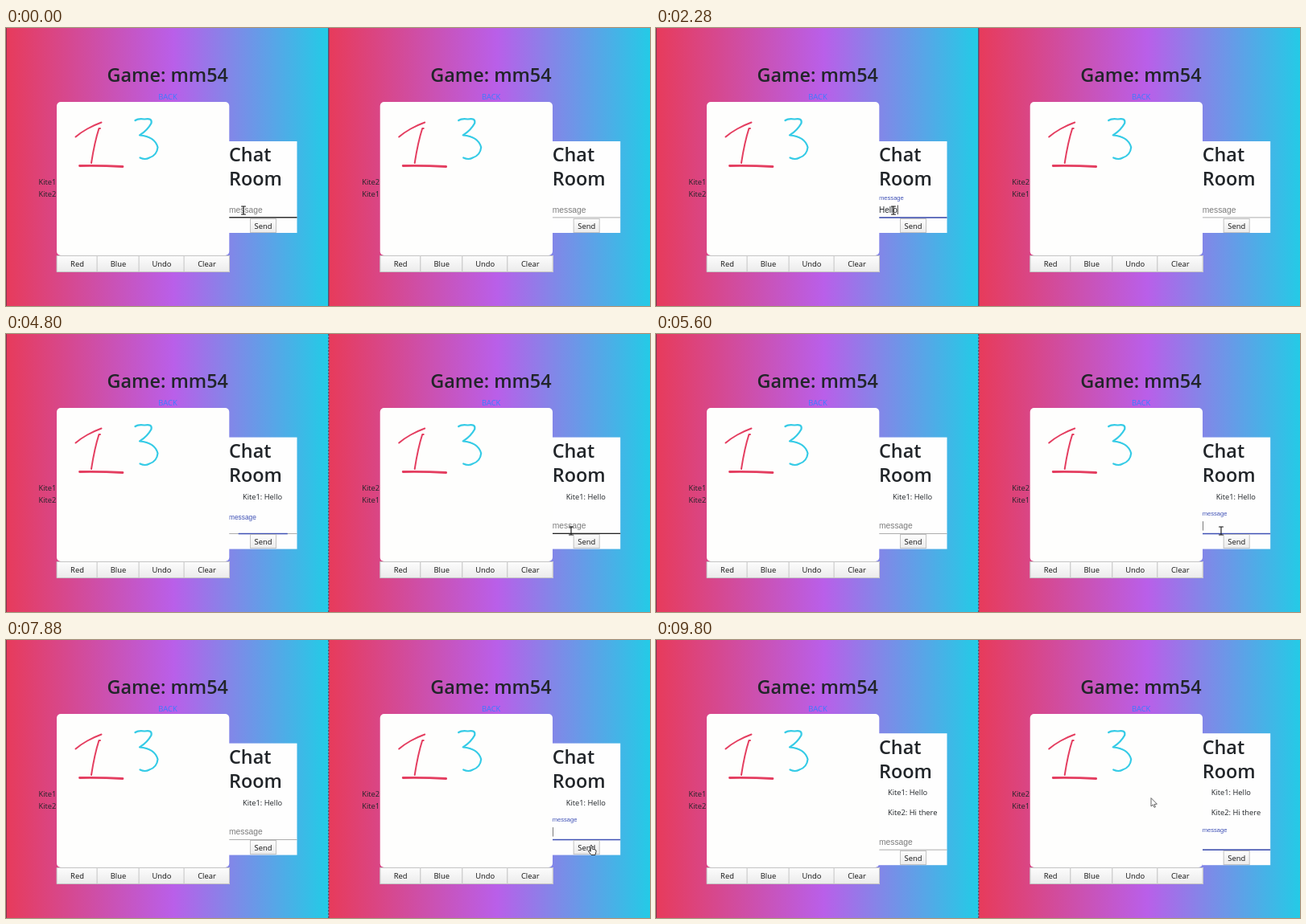
Animation of 800 by 346 pixels, one loop 9.88 s. Source, as an HTML page with a canvas:

```html
<!DOCTYPE html>
<html lang="en">
<head>
<meta charset="utf-8">
<title>Drawing game with chat</title>
<style>
html, body { margin: 0; width: 100%; height: 100%; overflow: hidden; }
canvas { display: block; }
</style>
</head>
<body>
<canvas id="stage" width="800" height="346"></canvas>
<script>
const ctx = document.getElementById('stage').getContext('2d');
const LOOP = 9880, BLINK = 530, SHIFT = 401.7;
const UI = '"Open Sans", "Noto Sans", sans-serif';
const FIELD = '"Liberation Sans", Arial, sans-serif';
const INK = '#212529', INDIGO = '#3f51b5', RED = '#e43e60', BLUE = '#35cbe6';
const TITLE = `600 23.4px ${UI}`;
const PLAYERS = ['Kite1', 'Kite2'];

const chats = [
  { focus: 480, blur: 4770, typeFrom: 1400, typeTo: 2300, sent: 3200, text: 'Hello' },
  { focus: 4900, blur: Infinity, typeFrom: 5500, typeTo: 6500, sent: 7700, text: 'Hi there' }
];
const arrivals = [3500, 8000];

// time, x, y
const mousePath = [
  [0, 295, 227], [2500, 295, 227], [3000, 313, 243], [3500, 313, 243],
  [4500, 702, 245], [6900, 702, 245], [7600, 727, 255], [8300, 727, 255],
  [9200, 615, 197], [LOOP, 615, 197]
];

const clamp = u => Math.max(0, Math.min(1, u));
const easeOut = u => 1 - (1 - clamp(u)) ** 2;
const smooth = u => u * u * (3 - 2 * u);
const mix = (a, b, u) => a + (b - a) * u;

function mouseAt(t) {
  const i = mousePath.findIndex(p => p[0] > t);
  const [t0, x0, y0] = mousePath[i - 1], [t1, x1, y1] = mousePath[i];
  const u = smooth((t - t0) / (t1 - t0));
  return { x: mix(x0, x1, u), y: mix(y0, y1, u) };
}

function label(text, x, y, font, color = INK, align = 'left') {
  ctx.font = font;
  ctx.fillStyle = color;
  ctx.textAlign = align;
  ctx.fillText(text, x, y);
}

function box(x, y, w, h, fill) {
  ctx.fillStyle = fill;
  ctx.fillRect(x, y, w, h);
}

function button(text, x, y, w, h, baseline) {
  const shade = ctx.createLinearGradient(0, y, 0, y + h);
  shade.addColorStop(0, '#fdfdfd');
  shade.addColorStop(1, '#ebebeb');
  box(x, y, w, h, shade);
  ctx.strokeStyle = '#c4c4c4';
  ctx.lineWidth = 1;
  ctx.strokeRect(x + .5, y + .5, w - 1, h - 1);
  label(text, x + w / 2, baseline, `9.4px ${UI}`, '#111', 'center');
}

function stroke(path, color, width) {
  ctx.strokeStyle = color;
  ctx.lineWidth = width;
  ctx.lineCap = ctx.lineJoin = 'round';
  ctx.stroke(new Path2D(path));
}

function background() {
  const g = ctx.createLinearGradient(0, 0, 401, 0);
  g.addColorStop(0, '#e73b5b');
  g.addColorStop(.52, '#b95fe9');
  g.addColorStop(1, '#22cce6');
  box(-1, 0, 403, 346, g);
}

function drawing() {
  ctx.fillStyle = '#fefefd';
  ctx.beginPath();
  ctx.roundRect(63, 92, 214.3, 191, 5);
  ctx.fill();
  stroke('M86.5 135.5 Q93 130 101 125.5 T118.5 117.5', RED, 2);
  stroke('M117 125 L115.5 125 Q110 142 106 168', RED, 2);
  stroke('M91.5 171.5 Q118 171 145 172.5', RED, 2.8);
  stroke('M160.5 115 Q164 112.5 172 113.5 Q182 111.5 180.5 118.5 Q176 127 166 133.5 ' +
    'Q185 135 188.5 148.5 Q187.5 158.5 178 161.5 Q173 164.5 166.5 161.5', BLUE, 2.2);
}

function inputValue(c, t) {
  if (t >= c.sent) return '';
  const u = clamp((t - c.typeFrom) / (c.typeTo - c.typeFrom));
  return c.text.slice(0, Math.floor(u * c.text.length));
}

function caretOn(c, t) {
  if (t < c.focus || t >= c.blur) return false;
  if (t >= c.typeFrom && t < c.typeTo) return true;
  const since = t >= c.sent ? c.sent : t >= c.typeTo ? c.typeTo : c.focus;
  return (t - since) % (2 * BLINK) < BLINK;
}

function chatPanel(c, t, count, over) {
  const top = 141 - 12.4 * count, bottom = 255 + 12.6 * count;
  box(277, top, 84.5, bottom - top, '#fefefe');
  label('Chat', 277, top + 25.3, TITLE);
  label('Room', 277, top + 55.3, TITLE);
  for (let i = 0; i < count; i++) {
    label(`${PLAYERS[i]}: ${chats[i].text}`, count === 1 ? 294 : 288, top + 77 + 25 * i, `9.3px ${UI}`);
  }

  // Label and underline share one focus transition
  const focused = t >= c.focus && t < c.blur + 100;
  const lift = easeOut((t - c.focus) / 200) - easeOut((t - c.blur) / 200);
  label('message', 277, bottom - mix(25.3, 41.4, lift),
    `${mix(10.3, 7.6, lift)}px ${FIELD}`, focused ? INDIGO : '#7c7c7c');

  const value = inputValue(c, t);
  label(value, 277, bottom - 25.5, `10px ${FIELD}`);
  if (caretOn(c, t)) {
    box(277 + ctx.measureText(value).width, bottom - 34.5, 1, 11.5, '#444');
  }

  const line = bottom - 19.5;
  box(277, line, 84.5, .8, '#999');
  if (over === 'text' && t < c.focus) box(277, line - .4, 84.5, 1.3, '#212121');
  box(319.25 - 42.25 * lift, line - .3, 84.5 * lift, 1.5, INDIGO);
  button('Send', 303, Math.round(bottom - 18.2), 33, 18, bottom - 5.4);
}

// Which pointer the mouse takes inside one window
function hit(m, left, count) {
  const x = m.x - left, bottom = 255 + 12.6 * count;
  if (x > 303 && x < 336 && m.y > bottom - 18 && m.y < bottom) return 'hand';
  if (x > 277 && x < 361 && m.y > bottom - 38 && m.y < bottom - 18) return 'text';
  return '';
}

function pointer(m, kind) {
  ctx.save();
  ctx.translate(m.x, m.y);
  if (kind === 'text') {
    stroke('M-2.5 -5 H2.5 M0 -5 V5 M-2.5 5 H2.5', '#111', 1.1);
  } else {
    const shape = kind === 'hand'
      ? 'M-1 1 Q0 -1 1 1 V5 L5 6 Q6.5 6.5 6 8.5 L5 12.5 H0 L-3.5 8 Q-3.5 6 -1 8 Z'
      : 'M0 0 V10 L2.4 7.9 L4 11.4 L5.5 10.7 L4 7.4 L7 7.2 Z';
    ctx.fillStyle = '#fff';
    ctx.fill(new Path2D(shape));
    stroke(shape, kind === 'hand' ? '#222' : '#555', .9);
  }
  ctx.restore();
}

function windowView(index, t, count, over) {
  ctx.save();
  ctx.translate(index * SHIFT, 0);
  background();
  label('Game: mm54', 200.7, 67, TITLE, INK, 'center');
  label('BACK', 201, 88.7, `9.4px ${UI}`, '#377dff', 'center');
  label(PLAYERS[index], 40.5, 194.5, `9.3px ${UI}`);
  label(PLAYERS[1 - index], 40.5, 209.5, `9.3px ${UI}`);
  chatPanel(chats[index], t, count, over);
  drawing();
  const edges = [63, 113, 165, 221, 277];
  ['Red', 'Blue', 'Undo', 'Clear'].forEach((name, i) =>
    button(name, edges[i], 283, edges[i + 1] - edges[i] + 1, 21, 297.3));
  ctx.restore();
}

function windowEdges(t) {
  box(0, 0, 1, 346, 'rgba(70, 45, 75, .6)');
  ctx.strokeStyle = '#4b3a5c';
  ctx.lineWidth = 1;
  ctx.lineCap = 'butt';
  ctx.setLineDash(t < 4800 ? [] : [2, 2]);
  ctx.beginPath();
  ctx.moveTo(400.8, 0);
  ctx.lineTo(400.8, 346);
  ctx.stroke();
  ctx.setLineDash([]);
}

function render(t) {
  const count = arrivals.filter(a => t >= a).length;
  const m = mouseAt(t);
  const over = [hit(m, 0, count), hit(m, SHIFT, count)];
  windowView(0, t, count, over[0]);
  windowView(1, t, count, over[1]);
  windowEdges(t);
  pointer(m, over[0] || over[1]);
}

const snap = t => Math.floor(t / 200) * 200 + (t % 200 >= 80 ? 100 : 0);

const start = performance.now();
function tick() {
  render(snap((performance.now() - start) % LOOP));
  requestAnimationFrame(tick);
}
tick();
</script>
</body>
</html>
```
